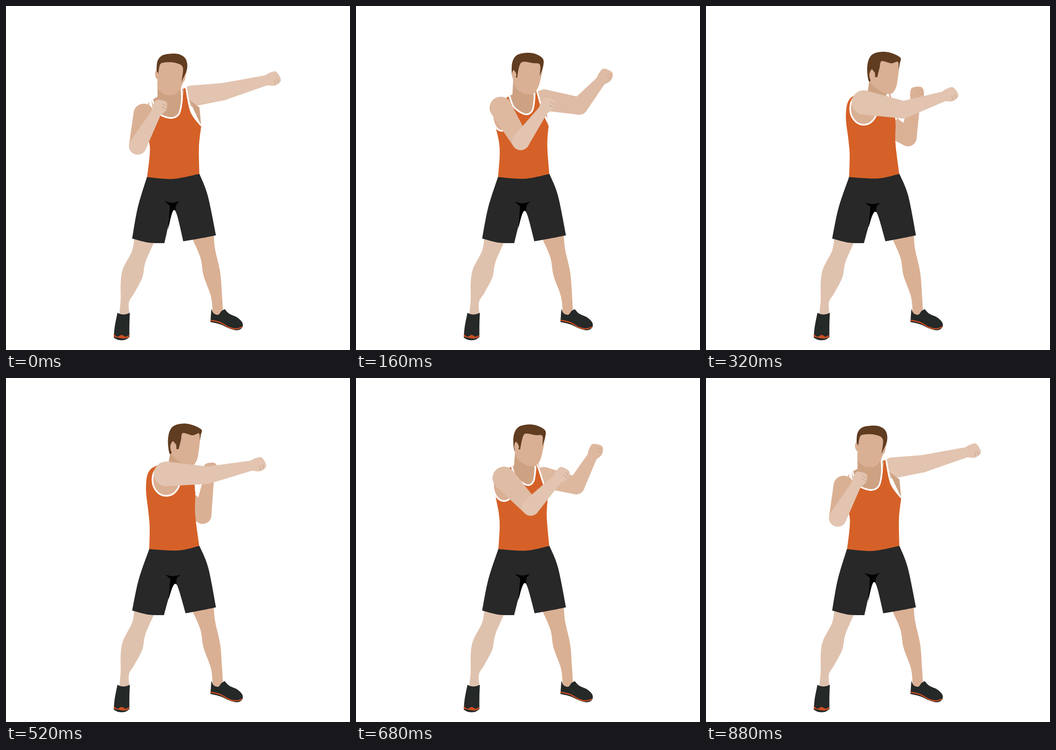
Animation, 747 px wide and 750 px high, one loop 960 ms. Source, as an HTML page with a canvas:

```html
<!DOCTYPE html>
<html>
<head>
<meta charset="utf-8">
<style>
html, body { margin: 0; width: 100%; height: 100%; overflow: hidden; background: #fff; }
canvas { display: block; }
</style>
</head>
<body>
<canvas width="747" height="750"></canvas>
<script>
const ctx = document.querySelector('canvas').getContext('2d');
const PERIOD = 960, STEP = 40;
const LIGHT = [226, 196, 176], MID = [218, 176, 148];
const SKIN = '#dab094', SHADE = '#cda283', CREASE = '#cca58c', HAIR = '#603c20', WHITE = '#fff';
const SHIRT = '#d56128', SHORTS = '#282828', SHOE = '#252928', SOLE = '#cb4f23', SHIN = '#dfc2ae';

// How far the body has turned: 0 faces front, 1 faces sideways
const swing = t => (1 - Math.cos(2 * Math.PI * (t + STEP) / PERIOD)) / 2;
const FRONT = swing(0), SIDE = swing(520);
function turnAt(t) {
  const w = Math.max(0, Math.min(1.05, (swing(t) - FRONT) / (SIDE - FRONT)));
  return w * (1 + (1 - w) / 4);
}

const mix = (a, b, s) => a.map((v, i) => v + (b[i] - v) * s);
const rgb = (a, b, s) => `rgb(${mix(a, b, s).map(Math.round)})`;

// Path from one place to another, bowed sideways on the way
const arcPath = (from, to, bow) => s => mix(from, to, s).map((v, i) => v + bow[i] * s * (1 - s));

// Smooth outline from "x,y" points ("!" is a sharp corner), front and side view
function outline(front, side = front) {
  const parse = text => text.split(' ').map(p => p.split(',').map(parseFloat));
  const a = parse(front), b = parse(side);
  const corners = front.split(' ').map(p => p.endsWith('!'));
  return { corners, at: s => a.map((p, i) => mix(p, b[i], s)) };
}

const LEFT_LEG = outline('279,500! 274,533 254,573 249,605 249,640 246,672! 268,672! 267,646 279,625 296,592 303,558 324,510!');
const RIGHT_LEG = outline('403,504! 422,548 429,588 445,633 449,670! 459,675 471,662! 469,630 465,580 454,530 451,495!');
const LEFT_SHOE = outline('242,669! 250,672 260,672 269,669! 268,695 268,722! 258,728 244,728 234,723! 236,700');
const LEFT_SOLE = outline('234,715! 242,721 251,717 260,721 267,717! 267,722! 255,725 234,721!');
const RIGHT_SHOE = outline('446,660! 451,670 461,673 468,665 475,661! 485,671 502,679 513,690 513,701 502,707 485,703 465,694 444,689!');
const RIGHT_SOLE = outline('444,685 465,690 485,701 500,704 513,700');

const SHORTS_SHAPE = outline(
  '306,373! 362,377 420,366! 438,413 456,500! 420,507 385,513! 372,458 364,445 356,465 344,517! 310,516 274,507! 286,440',
  '311,373! 374,376 420,366! 439,413 456,500! 422,507 390,513! 374,458 366,449 357,467 343,517! 310,516 274,507! 288,440');
const GUSSET = outline(
  '344,425! 361,429 377,425! 370,434 368,446! 364,445 359,457 352,487! 356,436!',
  '346,429! 362,432 379,429! 371,437 370,450! 366,449 360,460 353,483! 357,438!');
const SHIRT_SHAPE = outline(
  '310,211! 305,235 300,262 311,298 312,325 306,376! 362,380 420,369! 419,308 424,261! 402,230 391,178!',
  '352,183! 313,200 304,238 309,290 312,325 311,376! 372,380 420,369! 411,300 411,262! 410,232 400,192!');
const NECK = outline('329,160! 329,203! 381,205! 380,165!', '357,160 353,184 400,200 405,175');
const NECKLINE = outline(
  '318,205 329,232 355,244 375,236 382,205 381,180',
  '353,185 361,207 383,226 392,219 394,202 394,193');
const STRAP = outline('391,178 402,230 424,261', '395,192 410,227 412,247');
const ARMPIT = outline('398,205! 420,221! 424,261!', '404,225 406,240 409,255');

const FACE = outline(
  '331,130 329,160 330,180 343,192 356,194 368,192 378,181 385,165 392,140 380,118 345,115',
  '365,135 357,160 368,176 387,188 397,191 406,191 414,180 418,163 421,128 412,113 380,110');
const LEFT_EAR = outline('325,141 324,152 329,160 331,148', '363,138 357,148 360,162 370,152');
const RIGHT_EAR = outline('390,149 388,162 381,169 385,156', '412,148 411,160 408,165 409,155');
const HAIR_SHAPE = outline(
  '328,150 327,140 329,120 339,108 358,104 378,106 391,117 393,138 381,165! 384,134 368,124 345,123 334,129 330,157! 328,156! 328,148!',
  '357,166 352,147 353,124 361,107 378,100 400,101 424,112 423,124 421,137 419,121 405,125 384,120 380,135 375,155 370,155 369,142');

const FIST = outline('0,-11! 13,-14 26,-12 31,8 16,16 0,11!');
const CREASES = [outline('17,4 18,14'), outline('24,3 24,12')];

const LEFT_ARM = {
  shoulder: arcPath([299, 235], [348, 209], [-27, -6]),
  elbow: arcPath([286, 305], [437, 212], [18, 128]),
  wrist: arcPath([326, 233], [533, 191], [-48, 53])
};
const RIGHT_ARM = {
  shoulder: arcPath([405, 196], [400, 275], [25, -106]),
  elbow: arcPath([470, 187], [427, 299], [137, -76]),
  wrist: arcPath([565, 162], [441, 215], [85, -87])
};
const ARMHOLE = {
  center: arcPath([314, 245], [348, 222], [-52, 3]),
  radius: arcPath([3, 38], [30, 35], [20, 0])
};

// Catmull-Rom curve through the points
function trace({ corners, at }, s, closed) {
  const pts = at(s), n = pts.length;
  const point = i => pts[closed ? (i + n) % n : Math.max(0, Math.min(n - 1, i))];
  ctx.beginPath();
  ctx.moveTo(...pts[0]);
  for (let i = 0; i < (closed ? n : n - 1); i++) {
    const a = point(i), b = point(i + 1);
    const before = corners[i] ? a : point(i - 1);
    const after = corners[(i + 1) % n] ? b : point(i + 2);
    ctx.bezierCurveTo(
      a[0] + (b[0] - before[0]) / 6, a[1] + (b[1] - before[1]) / 6,
      b[0] - (after[0] - a[0]) / 6, b[1] - (after[1] - a[1]) / 6, ...b);
  }
}

function fill(shape, color, s = 0) {
  trace(shape, s, true);
  ctx.fillStyle = color;
  ctx.fill();
}

function stroke(shape, color, width, s = 0) {
  trace(shape, s, false);
  ctx.strokeStyle = color;
  ctx.lineWidth = width;
  ctx.stroke();
}

const angle = (a, b) => Math.atan2(b[1] - a[1], b[0] - a[0]);

// Tapered limb with round ends
function limb(a, b, ra, rb, color) {
  const dir = angle(a, b), quarter = Math.PI / 2;
  ctx.beginPath();
  ctx.arc(...a, ra, dir + quarter, dir - quarter);
  ctx.arc(...b, rb, dir - quarter, dir + quarter);
  ctx.fillStyle = color;
  ctx.fill();
}

function arm({ shoulder, elbow, wrist }, s, shoulderRadius, upperColor, lowerColor) {
  const e = elbow(s), w = wrist(s);
  limb(shoulder(s), e, shoulderRadius, 19, upperColor);
  limb(e, w, 19, 11, lowerColor);
  ctx.save();
  ctx.translate(...w);
  ctx.rotate(angle(e, w));
  fill(FIST, lowerColor);
  CREASES.forEach(c => stroke(c, CREASE, 1.5));
  ctx.restore();
}

function armhole(s) {
  ctx.beginPath();
  ctx.ellipse(...ARMHOLE.center(s), ...ARMHOLE.radius(s), 0, 0, 2 * Math.PI);
  ctx.fillStyle = SKIN;
  ctx.fill();
  ctx.strokeStyle = WHITE;
  ctx.lineWidth = 3.5;
  ctx.stroke();
}

function draw(time) {
  const s = turnAt(time);
  const fading = rgb(LIGHT, MID, s), rising = rgb(MID, LIGHT, s);
  ctx.fillStyle = WHITE;
  ctx.fillRect(0, 0, 747, 750);

  arm(RIGHT_ARM, s, 23, fading, fading);
  fill(ARMPIT, SHADE, s);

  fill(LEFT_LEG, SHIN);
  fill(RIGHT_LEG, SKIN);
  fill(LEFT_SHOE, SHOE);
  fill(LEFT_SOLE, SOLE);
  fill(RIGHT_SHOE, SHOE);
  stroke(RIGHT_SOLE, SOLE, 2.5);

  fill(SHIRT_SHAPE, SHIRT, s);
  fill(NECK, SHADE, s);
  fill(NECKLINE, SHADE, s);
  stroke(NECKLINE, WHITE, 3.5, s);
  stroke(STRAP, WHITE, 3.5, s);
  armhole(s);
  fill(SHORTS_SHAPE, SHORTS, s);
  fill(GUSSET, '#000', s);

  fill(FACE, SKIN, s);
  fill(RIGHT_EAR, SKIN, s);
  fill(HAIR_SHAPE, HAIR, s);
  fill(LEFT_EAR, SKIN, s);

  arm(LEFT_ARM, s, 22 + 5 * s, rising, rgb(LIGHT, LIGHT, 0));
}

const start = performance.now();
function tick() {
  const elapsed = (performance.now() - start) % PERIOD;
  draw(Math.floor(elapsed / STEP) * STEP);
  requestAnimationFrame(tick);
}
tick();
</script>
</body>
</html>
```
